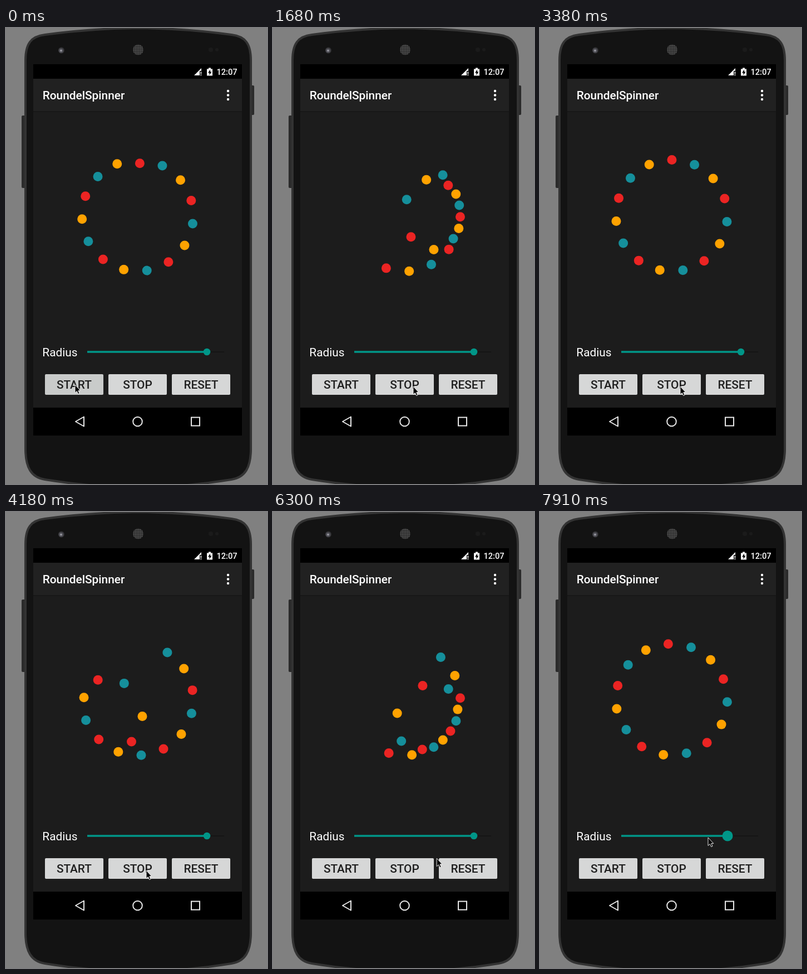
Recreate the animation shown at these times as an HTML page. Size 469 by 818 pixels, loop 8000 ms.

```html
<!DOCTYPE html>
<html lang="en">
<head>
<meta charset="utf-8">
<style>
  html, body { margin: 0; width: 100%; height: 100%; overflow: hidden; background: #808080; }
  svg { display: block; width: 469px; height: 818px; font-family: Roboto, sans-serif; }
  .medium { font-weight: 500; }
  .label { font-size: 20.83px; }
</style>
</head>
<body>
<svg viewBox="0 0 469 818">
  <defs>
    <pattern id="mesh" width="3" height="3" patternUnits="userSpaceOnUse">
      <rect width="3" height="3" fill="#222"/>
      <circle cx="1.5" cy="1.5" r="1.1" fill="#666"/>
    </pattern>
    <radialGradient id="lens" cx=".45" cy=".55">
      <stop offset="0" stop-color="#c4c4cc"/>
      <stop offset=".4" stop-color="#5a5a62"/>
      <stop offset="1" stop-color="#2c2c2e"/>
    </radialGradient>
  </defs>

  <!-- phone -->
  <rect x="28" y="157" width="7" height="130" rx="2" fill="#2b2b2b"/>
  <rect x="440" y="103" width="6" height="53" rx="2" fill="#2b2b2b"/>
  <path d="M35 58C35 28 45 15 70 12Q150 1 238 0Q325 1 405 12C430 15 440 28 440 58V755C440 788 430 806 405 810Q325 823 238 825Q150 823 70 810C45 806 35 788 35 755Z"
        fill="#131313" stroke="#333" stroke-width="4"/>
  <circle cx="99.5" cy="40" r="5.5" fill="url(#lens)"/>
  <circle cx="237.5" cy="39" r="9.5" fill="url(#mesh)"/>
  <circle cx="368" cy="39" r="4" fill="#1b1b1b"/>
  <circle cx="379" cy="39" r="3" fill="#1b1b1b"/>

  <!-- screen -->
  <rect x="49" y="65" width="375" height="666"/>
  <rect x="49" y="91" width="375" height="590" fill="#1c1c1c"/>
  <rect x="49" y="91" width="375" height="58" fill="#212121"/>
  <rect x="49" y="149" width="375" height="2" fill="#171717"/>

  <g fill="#fff">
    <path d="M338 85L351 72V77H348V85Z"/>
    <path d="M349.5 78.5h1.7v4h-1.7zM349.5 83.5h1.7v1.7h-1.7z"/>
    <path d="M361 73.5h3v-2h4v2h3v12h-10z"/>
    <path d="M367 74.5L363 80.5H365.5V84.5L369.5 78.5H367Z" fill="#000"/>
    <text class="medium" x="378.5" y="84" font-size="14.6">12:07</text>
    <text class="medium label" x="65.7" y="128">RoundelSpinner</text>
    <text class="label" x="65.3" y="589">Radius</text>
    <circle cx="399" cy="113" r="2.2"/>
    <circle cx="399" cy="120.5" r="2.2"/>
    <circle cx="399" cy="128" r="2.2"/>
  </g>

  <g fill="none" stroke="#e8e8e8" stroke-width="2">
    <path d="M125 706L140 697.5V714.5Z" stroke-linejoin="round"/>
    <circle cx="236.5" cy="706" r="8.3"/>
    <rect x="333" y="698.5" width="15" height="15"/>
  </g>

  <path d="M146 581H392" stroke="#151515" stroke-width="2"/>
  <path id="track" stroke="#009688" stroke-width="3.5"/>
  <circle id="thumb" cy="581" fill="#009688"/>
  <g id="buttons"></g>
  <g id="dots"></g>
  <path id="cursor" d="M0 0V14.5L3.3 11.5L5.6 16.5L8 15.5L5.800 10.6H9.800Z" stroke="#fff" stroke-width=".9"/>
</svg>

<script>
const LOOP = 8000, STEP = 88.9, LAST_STEP = 89;
const COUNT = 15, RADIUS = 100, CX = 236.5, CY = 336.5;
const COLORS = ['#eb2423', '#158f9b', '#ffa200'];
const PAUSE = 4420, RESUME = 5738;
const $ = id => document.getElementById(id);

function add(parent, tag, attrs) {
  const node = document.createElementNS('http://www.w3.org/2000/svg', tag);
  for (const key in attrs) node.setAttribute(key, attrs[key]);
  return parent.appendChild(node);
}

const buttons = ['START', 'STOP', 'RESET'].map((name, i) => {
  const x = 70 + i * 114;
  const face = add($('buttons'), 'rect', { x, y: 621, width: 105, height: 37, rx: 2 });
  add($('buttons'), 'text', {
    x: x + 52.5, y: 647, 'text-anchor': 'middle', class: 'medium label', fill: '#1f1f1f'
  }).textContent = name;
  return face;
});

const dots = Array.from({ length: COUNT }, (_, i) =>
  add($('dots'), 'circle', { r: 8.5, fill: COLORS[i % 3] }));

// [time, x, y] of the pointer tip
const pointerPath = [
  [0, 124, 640], [350, 140, 648], [710, 150, 645], [890, 152, 647], [1100, 175, 648],
  [1600, 252, 643], [4710, 252, 643], [5160, 131, 641], [5850, 131, 641],
  [6300, 293, 622], [6480, 312, 611], [6950, 356, 579], [7450, 358, 579], [7910, 302, 584]
];

const clamp = p => Math.min(1, Math.max(0, p));
const easeInOutCubic = p => p < 0.5 ? 4 * p ** 3 : 1 - 4 * (1 - p) ** 3;

function pointerAt(t) {
  const i = Math.max(1, pointerPath.findIndex(key => key[0] >= t));
  const [t0, x0, y0] = pointerPath[i - 1], [t1, x1, y1] = pointerPath[i];
  const p = clamp((t - t0) / (t1 - t0));
  return [x0 + (x1 - x0) * p, y0 + (y1 - y0) * p];
}

// Progress through one cycle, standing still between PAUSE and RESUME
function spinnerPhase(t) {
  const running = Math.min(t, PAUSE) + Math.max(0, t - RESUME);
  return (2.38 + 0.01003 * running) / 36 % 1;
}

// Each dot crosses the centre in turn while the ring rotates by 36 degrees
function drawDots(phase) {
  dots.forEach((dot, i) => {
    const order = (COUNT - i) % COUNT;
    const crossing = easeInOutCubic(clamp((phase - order * 0.044) * 3));
    const r = RADIUS * (1 - 2 * crossing);
    const angle = (i * 24 + phase * 36) * Math.PI / 180;
    dot.setAttribute('cx', CX + r * Math.sin(angle));
    dot.setAttribute('cy', CY - r * Math.cos(angle));
  });
}

function drawControls(t) {
  const pressed = [t < 100 || (t > 5650 && t < 5850), t > 4320 && t < 4500, false];
  buttons.forEach((face, i) => face.setAttribute('fill', pressed[i] ? '#c9cbca' : '#d6d7d7'));
  const x = 361 - 24 * clamp((t - 7640) / 270);
  $('track').setAttribute('d', `M146 581H${x}`);
  $('thumb').setAttribute('cx', x);
  $('thumb').setAttribute('r', 6.3 + 3.2 * clamp((t - 7200) / 150));
  $('cursor').setAttribute('transform', `translate(${pointerAt(t)})`);
}

function render(now) {
  const step = Math.min(LAST_STEP, Math.floor((now % LOOP + 14) / STEP));
  const t = Math.min(7910, step * STEP);
  drawDots(spinnerPhase(t));
  drawControls(t);
  requestAnimationFrame(() => render(performance.now()));
}
render(0);
</script>
</body>
</html>
```
